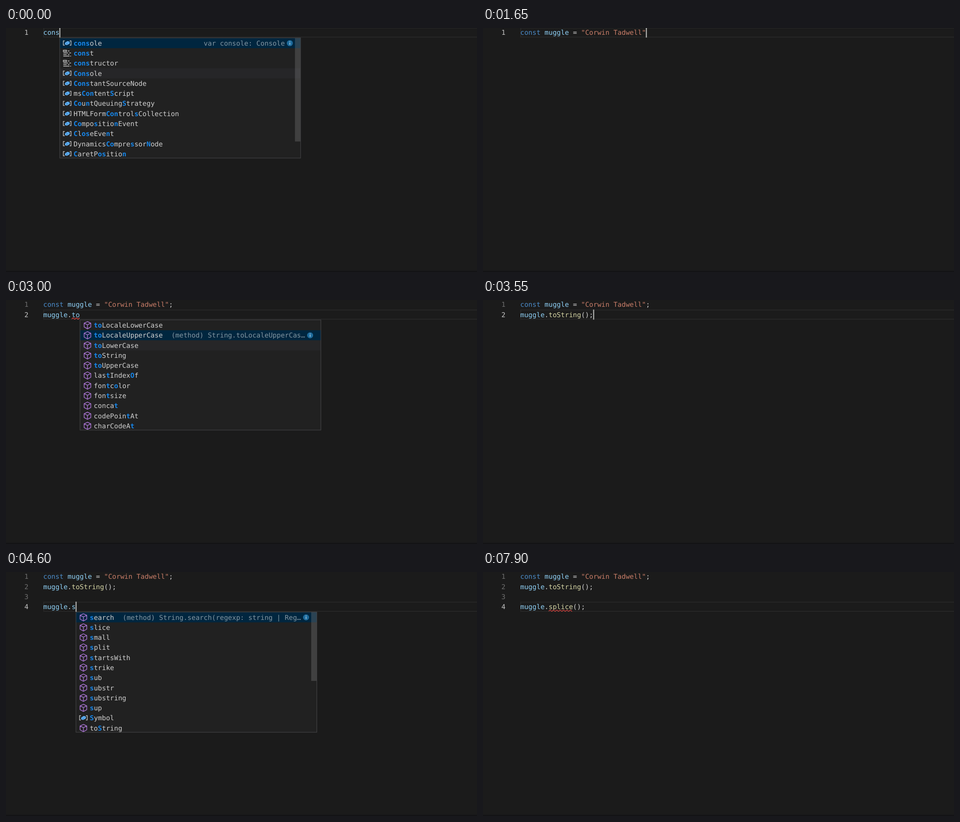
Write an HTML page that moves like this. It is 1037x540 px and loops after 8 s.

```html
<!DOCTYPE html>
<html lang="en">
<head>
<meta charset="utf-8">
<title>Editor autocomplete</title>
<style>
  html, body { margin: 0; width: 100%; height: 100%; overflow: hidden; background: #1b1b1b; }
  svg { display: block; width: 1037px; height: 540px; }
  text {
    font: 14.83px "DejaVu Sans Mono", monospace;
    white-space: pre;
    text-rendering: geometricPrecision;
    fill: #d0d0d0;
  }
  .number { fill: #6f6f6f; }
  .active { fill: #c6c6c6; }
  .keyword { fill: #4b8bc8; }
  .variable { fill: #8fd0f5; }
  .string { fill: #c87d68; }
  .call { fill: #d6d5a5; }
  .match { fill: #1686ea; font-weight: bold; }
  .detail { fill: #8496a2; }
  .faint { fill: #858585; }
  .link { fill: #3a8fe8; }
  .ui { font-family: Inter, sans-serif; font-size: 14px; }
</style>
</head>
<body>
<svg id="stage" viewBox="0 0 1037 540"></svg>
<script>
const LOOP = 8000, TICK = 50, BLINK = 250;
const CHAR = 8.93, LINE = 22.27, LEFT = 82;
const POPUP_WIDTH = 531.5, NAME = '"Corwin Tadwell"';
const stage = document.getElementById('stage');

// [start time, time per key, keys]
const typing = [
  [-200, 50, 'cons'], [50, 50, 't'], [150, 50, ' '], [250, 50, 'muggle'],
  [600, 50, ' '], [700, 50, '='], [800, 50, ' '], [900, 50, NAME],
  [1750, 50, ';'], [1850, 50, '\n'], [1950, 50, 'muggle'], [2350, 50, '.'],
  [2500, 50, 't'], [2750, 50, 'o'], [3250, 0, 'String'], [3300, 50, '();'],
  [3600, 100, '\n\n'], [3900, 150, 'mu'], [4200, 50, 'ggle'], [4450, 100, '.s'],
  [4650, 50, 'pli'], [4950, 100, 'ce'], [5250, 150, '()'], [5650, 50, ';']
];
const keys = typing.flatMap(([start, step, text]) =>
  [...text].map((char, i) => ({ time: start + i * step, char })));

// Each item: icon letter (v variable, k keyword, m method, c constant), then the label.
const split = text => text.split(' ');
const consItems = split('v*cons*ole k*cons*t k*cons*tructor v*Cons*ole v*Cons*tantSourceNode ' +
  'vms*Con*tent*S*cript v*Co*u*n*tQueuing*S*trategy vHTMLForm*Con*trol*s*Collection ' +
  'v*Co*mpo*s*itio*n*Event v*C*l*os*eEve*n*t vDynamics*Co*mpre*s*sor*N*ode v*C*aretP*os*itio*n*');
const constItems = split('k*const* k*const*ructor v*Const*antSourceNode');
const mItems = split('m*m*atchMedia v*m*enubar k*m*odule m*m*oveBy m*m*oveTo v*m*sContentScript ' +
  'm*m*sWriteProfilerMark c*m*uggle m*m*emo v*M*SAssertion v*M*SBlobBuilder v*M*SFIDOCredentialAssertion');
const dotItems = split('manchor mbig mblink mbold mcharAt mcharCodeAt mcodePointAt mconcat ' +
  'mendsWith mfixed mfontcolor mfontsize');
const toItems = split('m*to*LocaleLowerCase m*to*LocaleUpperCase m*to*LowerCase m*to*String ' +
  'm*to*UpperCase mlas*t*Index*O*f mfon*t*c*o*lor mfon*t*size mconca*t* mcodePoin*t*At mcharCodeA*t*');
const tItems = toItems.map(item => item.replace('*to*', '*t*o').replace('*O*', 'O').replace('*o*', 'o'));
const sItems = split('m*s*earch m*s*lice m*s*mall m*s*plit m*s*tartsWith m*s*trike m*s*ub m*s*ubstr ' +
  'm*s*ubstring m*s*up v*S*ymbol mto*S*tring');

const upper = '(method) String.toLocaleUpperCas…';
const lower = '(method) String.toLowerCase(): string';
const media = 'function matchMedia(query: string): Med…';
const anchor = '(method) String.anchor(name: string): string';
const splitDetail = '(method) String.split(separator: string |…';
const muggle = 'const muggle: ' + NAME;

// [from, to, column, items, selected, detail, scrollbar height]
const popups = [
  [0, 100, 4, consItems, 0, 'var console: Console', 229],
  [100, 150, 5, constItems, 0, '', 0],
  [2000, 2250, 2, mItems, 0, media, 36],
  [2250, 2400, 6, ['c*muggle*'], 0, muggle, 0],
  [2400, 2550, 7, dotItems, 0, anchor, 70],
  [2550, 3000, 8, tItems, 1, upper, 0],
  [3000, 3050, 9, toItems, 1, upper, 0],
  [3050, 3150, 9, toItems, 2, lower, 0],
  [3150, 3250, 9, toItems, 3, '(method) String.toString(): string', 0],
  [4050, 4400, 2, mItems, 0, media, 36],
  [4400, 4500, 6, ['c*muggle*'], 0, muggle, 0],
  [4500, 4600, 7, dotItems, 0, anchor, 70],
  [4600, 4700, 8, sItems, 0, '(method) String.search(regexp: string | Reg…', 152],
  [4700, 4800, 9, ['m*sp*lit'], 0, splitDetail, 0],
  [4800, 4950, 11, ['m*spli*t'], 0, splitDetail, 0]
];

// [from, to, line, first column, last column]
const squiggles = [[2550, 3000, 1, 7, 8], [3000, 3250, 1, 7, 9], [5500, LOOP, 3, 7, 13]];

// [time, x, y]
const mousePath = [[5850, 260, 100], [5950, 150, 30], [6000, 103, 20], [6150, 153, 63], [6300, 170, 76]];

const lineTop = line => line * LINE - 1.1;
const columnX = column => LEFT + column * CHAR;
const within = t => ([from, to]) => t >= from && t < to;
const rect = (x, y, w, h, fill, extra = '') =>
  `<rect x="${x}" y="${y}" width="${w}" height="${h}" fill="${fill}" ${extra}/>`;
const path = (d, stroke, width = 1.4, fill = 'none') =>
  `<path d="${d}" stroke="${stroke}" stroke-width="${width}" fill="${fill}"/>`;
const span = (text, name) => `<tspan class="${name}">${text}</tspan>`;
const label = (x, top, content, name = '') =>
  `<text x="${x}" y="${top + 16.5}" class="${name}">${content}</text>`;

const icons = {
  v: path('M-5.5-5h-3v9.5h3M5.5-5h3v9.5h-3', '#c5c5c5') +
    path('M-5-1L1-4.5 5.5-3V1L-.5 4.5-5 3Z', 'none', 0, '#62b2f6') +
    path('M-5-1L-.5.6 5.5-3M-.5.6V4.5', '#2f74ac', .8),
  k: path('M-8.5-6.5h7v3h-7zM1-5h4M-8.5-.5H2M4.5-.5h4M-8.5 3H-1M1.5 3h3.5M-8.5 6.5H5M6.5 6.5h2', '#c5c5c5'),
  m: path('M0-8L7.3-4.5V4L0 8-7.3 4V-4.5ZM-7.3-4.5L0-.8 7.3-4.5M0-.8V8', '#a873d0', 1.5),
  c: path('M-6-5.5H6Q7.2-5.5 7.2-4.3V4.5Q7.2 5.7 6 5.7H-6Q-7.2 5.7-7.2 4.5V-4.3Q-7.2-5.5-6-5.5Z', '#c5c5c5') +
    path('M-3.7-1.5H3.7M-3.7 2H3.7', '#62b2f6', 1.5)
};

function colorize(line) {
  return line.replace(/"[^"]*"?|\bconst\b|\w+(?=\()|\w+/g, token => span(token,
    token[0] === '"' ? 'string' : token === 'const' ? 'keyword' :
    line.includes(token + '(') ? 'call' : 'variable'));
}

function drawPopup([, , column, items, selected, detail, scroll], line) {
  const x = columnX(column), y = lineTop(line + 1), height = items.length * LINE;
  const right = x + POPUP_WIDTH, hover = Math.floor((100 - y) / LINE);
  const rows = items.map((item, i) => {
    const top = y + 1.2 + i * LINE, middle = top + LINE / 2;
    const fill = i === selected ? '#00263f' : i === hover ? '#262628' : '';
    const name = item.slice(1).replace(/\*(.+?)\*/g, (_, match) => span(match, 'match'));
    let row = (fill && rect(x, top, POPUP_WIDTH, LINE, fill)) +
      `<g transform="translate(${x + 17} ${middle})">${icons[item[0]]}</g>` + label(x + 31, top, name);
    if (i === selected && detail) {
      row += label(right - 35.3 - detail.length * CHAR, top, detail, 'detail') +
        `<circle cx="${right - 24.3}" cy="${middle}" r="6.6" fill="#1f6c9d"/>` +
        path(`M${right - 24.3} ${middle - 4}v1.6m0 1.4v4.5`, '#b9d5e6', 1.5);
    }
    return row;
  }).join('');
  return rect(x, y, POPUP_WIDTH, height, '#212121') +
    `<clipPath id="popup">${rect(x, y, POPUP_WIDTH, height, '#000')}</clipPath>` +
    `<g clip-path="url(#popup)">${rows}</g>` +
    (scroll && rect(right - 13, y + 1, 12.5, scroll, '#797979', 'opacity=".36"') || '') +
    rect(x + .6, y + .6, POPUP_WIDTH - 1.2, height - 1.2, 'none', 'stroke="#414143" stroke-width="1.2"');
}

function drawSquiggle([, , line, first, last]) {
  const x = columnX(first), y = lineTop(line) + 19.9, half = 3.7;
  const count = Math.round((last - first) * CHAR / half);
  let d = `M${x} ${y + 1.5}`;
  for (let i = 0; i < count; i++) d += `q${half / 2} ${i % 2 ? 3 : -3} ${half} ${i % 2 ? 3 : -3}`;
  return `<clipPath id="wave">${rect(x, y - 3, (last - first) * CHAR, 7, '#000')}</clipPath>` +
    `<g clip-path="url(#wave)">${path(d, '#d9443f', 1.4)}</g>`;
}

function drawTooltip(opacity) {
  const x = columnX(7), y = lineTop(4) + .4, width = 834, height = 129;
  const inner = x + 10;
  return `<g opacity="${opacity}">` +
    rect(x + .6, y + .6, width - 1.2, height - 1.2, '#212121', 'stroke="#414143" stroke-width="1.2"') +
    rect(x + 1, y + 96, width - 2, height - 97, '#282829') +
    path(`M${x} ${y + 34}h${width}M${x} ${y + 95.5}h${width}`, '#363637', 1.2) +
    label(inner, y + 6, 'any', 'keyword') +
    label(inner, y + 41, `Property 'splice' does not exist on type '${NAME}'. Did you mean 'slice'? ` +
      span('ts(2551)', 'faint')) +
    label(inner, y + 63.3, span('lib.es5.d.ts(450, 5): ', 'link') + "'slice' is declared here.") +
    label(inner, y + 101, span('Quick Fix...     Peek Problem', 'link ui')) + '</g>';
}

function drawMouse(t) {
  const next = mousePath.findIndex(([time]) => time > t);
  const b = mousePath[next < 0 ? mousePath.length - 1 : next];
  const a = next < 0 ? b : mousePath[next - 1];
  const part = a === b ? 0 : (t - a[0]) / (b[0] - a[0]);
  const x = a[1] + (b[1] - a[1]) * part, y = a[2] + (b[2] - a[2]) * part;
  const beam = `M${x - 4} ${y - 9}q4 0 4 3.5q0-3.5 4-3.5M${x} ${y - 6}v12` +
    `M${x - 4} ${y + 9}q4 0 4-3.5q0 3.5 4 3.5M${x - 2} ${y + 3}h4`;
  return path(beam, '#111', 3) + path(beam, '#eee', 1.5);
}

function draw(t) {
  const pressed = keys.filter(key => key.time <= t);
  const lines = pressed.map(key => key.char).join('').split('\n');
  const current = lines.length - 1, text = lines[current], top = lineTop(current);
  const caretX = columnX(text.length);

  // The editor closes quotes and brackets by itself.
  if (text.split('"').length === 2) lines[current] += '"';
  if (text.includes('(') && !text.includes(')')) lines[current] += ')';

  let out = rect(0, 537.5, 1037, 2.5, '#131315') +
    rect(LEFT + 1, top + 1, 970, LINE - 2, 'none', 'stroke="#272727" stroke-width="2"');
  lines.forEach((line, i) => {
    out += label(40.6, lineTop(i), i + 1, i === current ? 'active' : 'number') +
      label(LEFT, lineTop(i), colorize(line));
  });
  out += squiggles.filter(within(t)).map(drawSquiggle).join('');

  const idle = t - pressed[pressed.length - 1].time;
  if (Math.floor(idle / BLINK) % 2 === 0) out += rect(caretX - .3, top, 2.3, LINE, '#b4b5b3');

  const popup = popups.find(within(t));
  if (popup) out += drawPopup(popup, current);
  if (t >= 6450 && t < 7850) out += drawTooltip(Math.min(1, (t - 6400) / 150, (7850 - t) / 150));
  if (t >= 5850 && t < 7750) out += drawMouse(t);
  return out;
}

let shown = -1;
function frame(now) {
  const t = Math.floor(now % LOOP / TICK) * TICK;
  if (t !== shown) stage.innerHTML = draw(shown = t);
  requestAnimationFrame(frame);
}
frame(performance.now());
</script>
</body>
</html>
```
